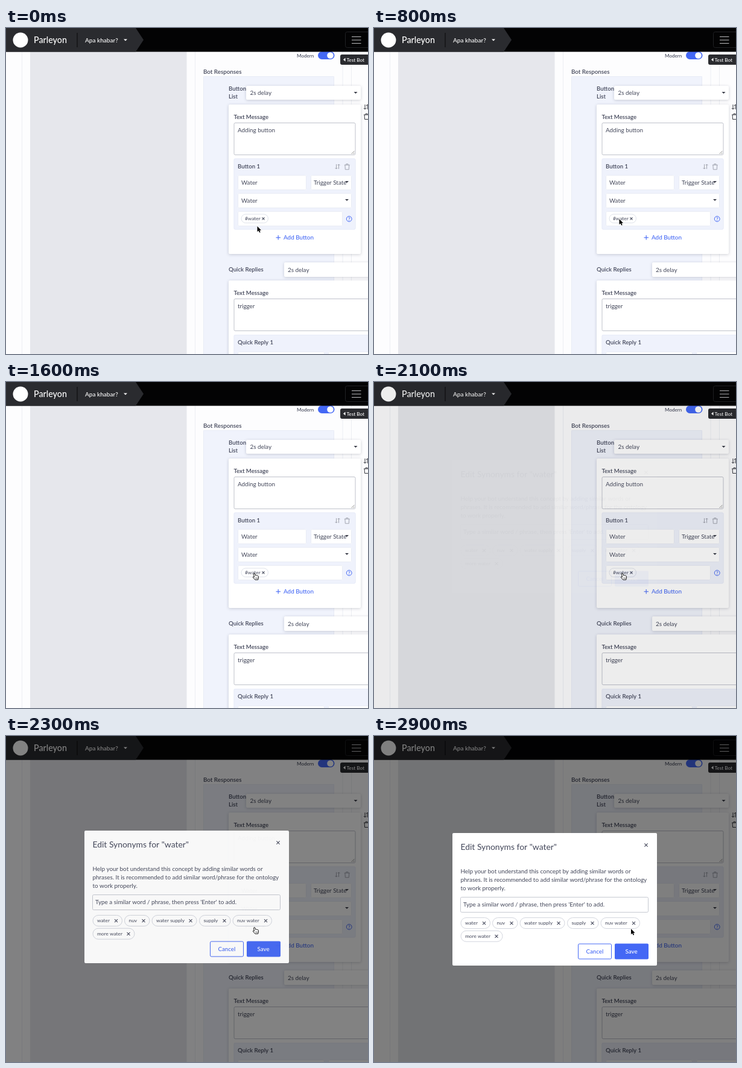
Animation, 600 px wide and 541 px high, one loop 3 s. Source, as an HTML page with a canvas:

```html
<!DOCTYPE html>
<html lang="en">
<head>
<meta charset="utf-8">
<title>Edit synonyms</title>
<style>
html, body { margin: 0; width: 100%; height: 100%; overflow: hidden; background: #fdfdfe; }
canvas { display: block; width: 600px; height: 541px; }
</style>
</head>
<body>
<canvas id="stage"></canvas>
<script>
const W = 600, H = 541, LOOP = 3000, STEP = 100;
const INK = '#43475a', BLUE = '#4468f5', PALE = '#eff2fc', EDGE = '#bfc2cb';
const ratio = window.devicePixelRatio || 1;

function layer(canvas) {
  canvas.width = Math.round(W * ratio);
  canvas.height = Math.round(H * ratio);
  const ctx = canvas.getContext('2d');
  ctx.scale(ratio, ratio);
  return ctx;
}
const stage = layer(document.getElementById('stage'));
const page = layer(document.createElement('canvas'));
const modal = layer(document.createElement('canvas'));
let g = page;

function rect(x, y, w, h, fill, radius = 0) {
  g.fillStyle = fill;
  g.beginPath();
  g.roundRect(x, y, w, h, radius);
  g.fill();
}

function frame(x, y, w, h, stroke, radius = 2, width = 1) {
  g.strokeStyle = stroke;
  g.lineWidth = width;
  g.beginPath();
  g.roundRect(x + .5, y + .5, w - 1, h - 1, radius);
  g.stroke();
}

function raised(x, y, w, h) {
  g.save();
  g.shadowColor = 'rgba(40,45,70,.22)';
  g.shadowBlur = 5 * ratio;
  g.shadowOffsetY = ratio;
  rect(x, y, w, h, '#fff', 2);
  g.restore();
}

function line(points, stroke, width = 1) {
  g.strokeStyle = stroke;
  g.lineWidth = width;
  g.beginPath();
  points.forEach(([x, y]) => g.lineTo(x, y));
  g.stroke();
}

function shape(points, fill) {
  g.fillStyle = fill;
  g.beginPath();
  points.forEach(([x, y]) => g.lineTo(x, y));
  g.closePath();
  g.fill();
}

function disc(x, y, r, fill) {
  g.fillStyle = fill;
  g.beginPath();
  g.arc(x, y, r, 0, 7);
  g.fill();
}

function text(s, x, y, size = 9.9, color = INK, weight = 400) {
  g.font = `${weight} ${size}px Lato, sans-serif`;
  g.fillStyle = color;
  g.fillText(s, x, y);
}
const label = (s, x, y) => text(s, x, y, 9.6, INK, 600);

function caret(x, y, color = '#3a3d48', r = 3) {
  shape([[x - r, y - r / 2], [x + r, y - r / 2], [x, y + r / 2]], color);
}

function cross(x, y, r, color = INK) {
  line([[x - r, y - r], [x + r, y + r]], color, 1.1);
  line([[x - r, y + r], [x + r, y - r]], color, 1.1);
}

function sortIcon(x, y, color) {
  line([[x - 2, y - 4], [x - 2, y + 4]], color);
  line([[x - 4, y + 2], [x - 2, y + 4], [x, y + 2]], color);
  line([[x + 2, y + 4], [x + 2, y - 4]], color);
  line([[x, y - 2], [x + 2, y - 4], [x + 4, y - 2]], color);
}

function trashIcon(x, y, color) {
  line([[x - 4.5, y - 3], [x + 4.5, y - 3]], color);
  line([[x - 1.5, y - 3], [x - 1.5, y - 4.7], [x + 1.5, y - 4.7], [x + 1.5, y - 3]], color);
  line([[x - 3.4, y - 3], [x - 3, y + 4.5], [x + 3, y + 4.5], [x + 3.4, y - 3]], color);
}

function textarea(x, y, w, h) {
  rect(x, y, w, h, '#fff', 2);
  frame(x, y, w, h, EDGE);
  const r = x + w - 2, b = y + h - 2;
  line([[r - 5, b], [r, b - 5]], '#777', .8);
  line([[r - 2, b], [r, b - 2]], '#777', .8);
}

function field(x, y, w, h = 25) {
  rect(x, y, w, h, '#fff', 2);
  frame(x, y, w, h, '#e9ecf5');
}

function drawHeader() {
  rect(0, 0, W, 39.5, '#030304');
  shape([[0, 0], [215, 0], [228, 19.7], [215, 39.5], [0, 39.5]], '#2a2b2f');
  line([[118, 8], [118, 32]], '#08080a');
  disc(24, 20, 12.5, '#fff');
  text('Parleyon', 46, 24.5, 14.3, '#fff', 500);
  text('Apa khabar?', 131, 23.5, 10.05, '#fff', 500);
  caret(198, 20, '#fff');
  frame(562, 6, 42, 27, '#202124', 3);
  [14.5, 20, 25.5].forEach(y => line([[573, y], [588.5, y]], '#b4b4b6', 1.1));
}

function drawButtonCard() {
  raised(369, 127, 219, 248);
  raised(398, 96, 190, 23);
  label('Button', 369, 103.5);
  label('List', 369, 117);
  text('2s delay', 404.5, 111);
  caret(579.5, 107.5);

  label('Text Message', 377.5, 150.5);
  textarea(377.5, 157, 202, 54);
  text('Adding button', 384, 173);

  rect(377.5, 216.5, 202, 118, PALE, 2);
  frame(377.5, 216.5, 202, 118, '#e8ecf8');
  label('Button 1', 384, 233);
  sortIcon(549.5, 230, '#a2a5b0');
  trashIcon(565.3, 230.3, '#a2a5b0');

  field(384, 244, 114);
  text('Water', 390, 260, 9.8);
  field(505, 244, 68);
  text('Trigger State', 510, 260);
  caret(565, 255.5);
  field(384, 274, 189);
  text('Water', 390, 290, 9.8);
  caret(565, 285.5);
  field(384, 304, 174);
  rect(389.5, 308.5, 45.5, 15.5, '#fff', 8);
  frame(389.5, 308.5, 45.5, 15.5, '#dfe2ea', 7.5);
  text('#water', 396, 319.2, 8.3);
  cross(426.5, 316.3, 2);

  g.strokeStyle = BLUE;
  g.lineWidth = 1;
  g.beginPath();
  g.arc(568.7, 316.8, 4.4, 0, 7);
  g.stroke();
  text('?', 566.9, 319.7, 7.8, BLUE, 600);

  line([[447.5, 347.8], [455, 347.8]], BLUE, 1.1);
  line([[451.2, 344], [451.2, 351.6]], BLUE, 1.1);
  text('Add Button', 460, 351.2, 9.9, BLUE, 500);
}

function drawReplies() {
  raised(369, 419, 260, 150);
  raised(461, 389, 180, 24);
  label('Quick Replies', 369, 404);
  text('2s delay', 467, 405);
  label('Text Message', 377.5, 442.8);
  textarea(377.5, 449, 250, 54);
  text('trigger', 384, 465.2, 9.8);
  rect(377.5, 509, 250, 60, PALE, 2);
  frame(377.5, 509, 250, 60, '#e8ecf8');
  label('Quick Reply 1', 384, 525);
  field(384, 537, 144);
  field(534, 537, 90);
}

function drawPage() {
  g = page;
  rect(0, 0, W, H, '#fdfdfe');
  rect(40, 39, 259.5, H, '#e6e7ec');
  [26.5, 313.5, 558, 572.5].forEach(x => line([[x, 39], [x, H]], '#eceef3'));
  rect(327, 80, 217, H, '#f0f3fc');
  frame(327, 80, 217, H, '#e8ecf6', 1);

  text('Modern', 482, 48.5, 8.1, INK, 500);
  rect(517, 39, 27.5, 13, BLUE, 6.5);
  disc(537.5, 45.5, 5.3, '#fff');
  text('Bot Responses', 327, 75.7, 9.8, INK, 600);

  drawButtonCard();
  drawReplies();
  sortIcon(597, 131, '#33353d');
  trashIcon(597.5, 147, '#33353d');
  rect(554, 44, 50, 17, '#2a2b2f', 3);
  shape([[562.5, 49.5], [562.5, 55.5], [559, 52.5]], '#fff');
  text('Test Bot', 564.5, 55.5, 8.2, '#fff', 500);
  drawHeader();
}

function chip(s, x, y, w) {
  frame(x, y, w, 19, '#d3d6de', 9);
  text(s, x + 7.5, y + 12.4, 8.35);
  cross(x + w - 10.5, y + 9.6, 2.5);
}

function drawModal() {
  g = modal;
  rect(130, 161, 339, 220, '#fff', 2);
  text('Edit Synonyms for "water"', 143.5, 189.2, 13.9);
  cross(451, 181, 2.6);
  text('Help your bot understand this concept by adding similar words or', 143.5, 227.5, 9.87);
  text('phrases. It is recommended to add similar word/phrase for the ontology', 143.5, 241.8, 9.87);
  text('to work properly.', 143.5, 256, 9.87);
  frame(143, 267, 312, 26, '#c6c9d1');
  text("Type a similar word / phrase, then press 'Enter' to add.", 148, 283.3, 9.9);
  chip('water', 143.5, 301, 49.5);
  chip('nuv', 196, 301, 42.5);
  chip('water supply', 241.5, 301, 75);
  chip('supply', 320, 301, 52.5);
  chip('nuv water', 375.5, 301, 65.5);
  chip('more water', 143.5, 322.7, 70);
  frame(338, 344.5, 56, 26, BLUE);
  text('Cancel', 351.5, 360.5, 9.7, BLUE, 500);
  rect(399, 344.5, 56, 26, BLUE, 2);
  text('Save', 416.5, 360.5, 9.8, '#fff', 500);
}

const ARROW = new Path2D('M0 0V9.2L2.1 7.3L3.6 10.6L5.2 9.9L3.7 6.7H6.6Z');
const HAND = new Path2D('M2.2 .9Q3.2 .1 3.9 1.1L4.6 4.1Q5.6 3.5 6.3 4.2' +
  'Q7.3 3.7 7.9 4.5Q9.2 4.2 9.5 5.4L9.7 8.2L8.9 11.2H4L.6 7.4Q.3 6 1.6 6.2L2.7 7L1.7 2.2Z');

function drawCursor(hand, x, y) {
  g.save();
  g.translate(x, y);
  g.lineJoin = 'round';
  if (hand) {
    g.fillStyle = '#fff';
    g.fill(HAND);
    g.strokeStyle = '#111';
    g.lineWidth = 1;
    g.stroke(HAND);
    [5, 6.5, 8].forEach(i => line([[i, 7.5], [i, 9.6]], '#111', .6));
  } else {
    g.strokeStyle = '#fff';
    g.lineWidth = 1.6;
    g.stroke(ARROW);
    g.fillStyle = '#000';
    g.fill(ARROW);
  }
  g.restore();
}

// Pointer stops: start time, hand or arrow, position.
const STOPS = [
  [0, false, 416.5, 329], [100, false, 565, 338], [200, false, 498, 338],
  [400, false, 478, 334], [500, false, 441, 323], [600, false, 411, 312],
  [700, false, 395, 310], [800, false, 406.5, 317], [1500, true, 407.5, 316.5],
  [1600, true, 408.8, 317], [2700, false, 415, 329], [2800, false, 421, 324],
  [2900, false, 426, 320]
];

// Modal entrance per step: [backdrop, opacity, lift].
const ENTRANCE = [[.07, .04, 31], [.42, .7, 12.5], [.49, .95, 4], [.5, .98, 1], [.5, .99, .3], [.5, 1, 0]];
const OPEN = 2100;

function draw(t) {
  g = stage;
  g.drawImage(page.canvas, 0, 0, W, H);
  if (t >= OPEN) {
    const i = Math.min(ENTRANCE.length - 1, Math.floor((t - OPEN) / STEP));
    const [dim, alpha, lift] = ENTRANCE[i];
    rect(0, 0, W, H, `rgba(0,0,0,${dim})`);
    g.globalAlpha = alpha;
    g.drawImage(modal.canvas, 0, -lift, W, H);
    g.globalAlpha = 1;
  }
  const [, hand, x, y] = STOPS.filter(s => s[0] <= t).pop();
  drawCursor(hand, x, y);
}

drawPage();
drawModal();
const start = performance.now();
function tick() {
  const t = (performance.now() - start) % LOOP;
  draw(Math.floor(t / STEP) * STEP);
  requestAnimationFrame(tick);
}
tick();
</script>
</body>
</html>
```
